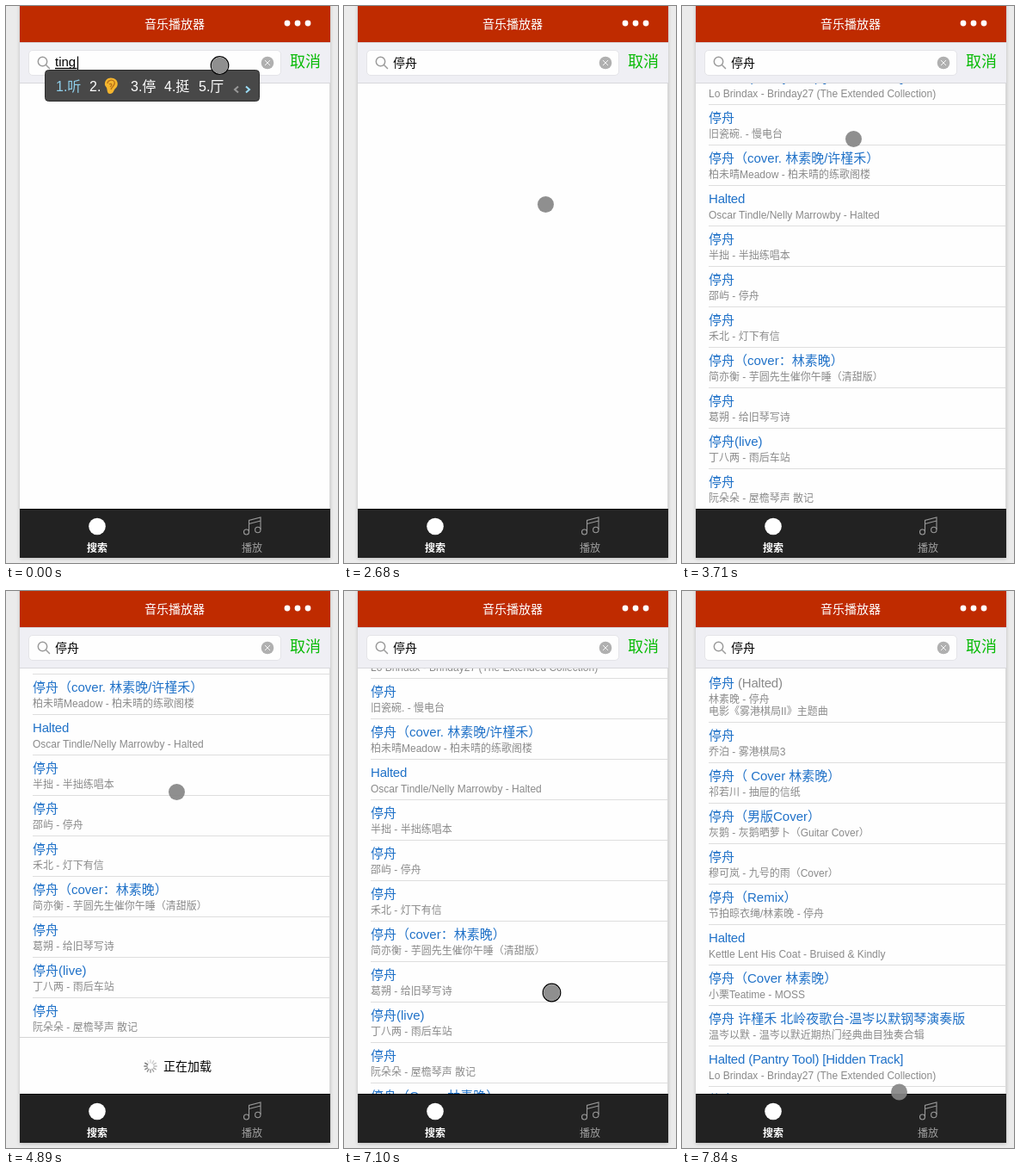
Animation, 386 px wide and 647 px high, one loop 7.99 s. Source, as an HTML page:

```html
<!DOCTYPE html>
<html lang="zh-CN">
<head>
<meta charset="utf-8">
<title>音乐播放器</title>
<style>
html, body { margin: 0; width: 100%; height: 100%; overflow: hidden; background: #ebebeb; }
svg { display: block; }
text {
  font-family: "Liberation Sans", "Noto Sans CJK SC", "Noto Sans CJK", sans-serif;
  white-space: pre;
  text-spacing-trim: space-all;
}
.latin { letter-spacing: -.2px; }
</style>
</head>
<body>
<svg id="stage" width="386" height="647" viewBox="0 0 386 647">
  <defs>
    <clipPath id="view"><rect x="16" y="90" width="361" height="494"/></clipPath>
    <filter id="soft" x="-10%" y="-10%" width="120%" height="120%"><feGaussianBlur stdDeviation="2"/></filter>
  </defs>
  <rect width="386" height="647" fill="#ebebeb"/>
  <rect x="16" y="-10" width="361" height="652" fill="#000" opacity=".2" filter="url(#soft)"/>
  <rect x="16" width="361" height="641" fill="#fefefe"/>

  <g id="list" clip-path="url(#view)">
    <g id="scroll">
      <g id="rows"></g>
      <g id="more"></g>
      <g id="footer">
        <path d="M16 1044.5H376" stroke="#d4d4d4"/>
        <g id="smallSpin" transform="translate(168 1078)"></g>
      </g>
    </g>
  </g>

  <rect x="16" width="361" height="42" fill="#bf2b00"/>
  <g fill="#fff"><circle cx="327" cy="20" r="3.4"/><circle cx="339" cy="20" r="3.4"/><circle cx="351" cy="20" r="3.4"/></g>

  <rect x="16" y="42" width="361" height="48" fill="#efeff4"/>
  <path d="M16 42.5H377M16 89.5H377" stroke="#d8d8dc"/>
  <rect x="26.5" y="51.5" width="293" height="29" rx="4.5" fill="#fefefe" stroke="#e4e4e8"/>
  <g fill="none" stroke="#9b9b9b" stroke-width="1.5" stroke-linecap="round">
    <circle cx="42.5" cy="64.5" r="5.2"/><path d="M46.5 68.5L50.5 72.5"/>
  </g>
  <circle cx="304" cy="66" r="7.3" fill="#b0b0b0"/>
  <path d="M301 63l6 6m0-6l-6 6" stroke="#f4f4f4"/>
  <g id="field"></g>
  <path id="underline" stroke="#000" stroke-width="1.4"/>
  <path id="caret" stroke="#000" stroke-width="1.2"/>

  <rect x="16" y="584" width="361" height="57" fill="#222"/>
  <path d="M16 584.5H377" stroke="#000"/>
  <circle cx="106" cy="604.5" r="9.8" fill="#fff"/>
  <g fill="none" stroke="#9a9a9a" stroke-width="1.1">
    <path d="M282.5 611V597.5L296 594V608M282.5 601.5L296 598"/>
    <circle cx="279.5" cy="611" r="3"/><circle cx="292.8" cy="608.5" r="3.2"/>
  </g>
  <path d="M376.5 90V584" stroke="#dadada"/>

  <g id="toast">
    <rect x="135" y="180" width="122" height="122" rx="5" fill="#5f5f5f"/>
    <g id="bigSpin" transform="translate(196 229)"></g>
  </g>

  <g id="popA"></g>
  <g id="popB"></g>

  <g id="arrow">
    <path d="M0 0V14.2L3.3 11.2L5.5 16L7.8 15L5.7 10.4H10.2Z" fill="#000" stroke="#fff" stroke-width=".9"/>
  </g>
  <g id="touch">
    <circle id="ring" r="10.3" fill="#fff" stroke="#000" stroke-width="1.2"/>
    <circle r="9.5" fill="#858585" opacity=".92"/>
  </g>
</svg>

<script>
const LOOP = 7990, TICK = LOOP / 54;
const NS = 'http://www.w3.org/2000/svg';
const $ = id => document.getElementById(id);

function add(parent, tag, attrs, content) {
  const el = document.createElementNS(NS, tag);
  for (const k in attrs) el.setAttribute(k, attrs[k]);
  if (content) el.textContent = content;
  parent.appendChild(el);
  return el;
}
const label = (parent, x, y, size, fill, str, extra) =>
  add(parent, 'text', { x, y, 'font-size': size, fill, ...extra }, str);
const show = (id, on) => $(id).setAttribute('display', on ? 'inline' : 'none');
const place = (id, x, y) => $(id).setAttribute('transform', `translate(${x} ${y})`);

// Fixed labels
const mid = { 'text-anchor': 'middle' };
const stage = $('list').parentNode;
const chrome = add(stage, 'g', {});
stage.insertBefore(chrome, $('toast'));
label(chrome, 196, 26, 14, '#fff', '音乐播放器', { ...mid, 'font-weight': 500 });
label(chrome, 330, 71, 18, '#09bb07', '取消');
label(chrome, 106, 634, 12, '#fff', '搜索', { ...mid, 'font-weight': 700 });
label(chrome, 286, 634, 12, '#a0a0a0', '播放', { ...mid, 'font-weight': 500 });
label($('toast'), 196, 271, 16, '#fff', '数据加载中', mid);
label($('footer'), 183, 1083, 14, '#000', '正在加载');
const typed = label($('field'), 57, 70, 15, '#000', '');

// Search results: title | subtitle
const SONG = '停舟';
const songs = [
  `${SONG}（Cover）|`,
  `${SONG}|乔泊 - 雾港棋局3`,
  `${SONG}（ Cover 林素晚）|祁若川 - 抽屉的信纸`,
  `${SONG}（男版Cover）|灰鹅 - 灰鹅晒萝卜（Guitar Cover）`,
  `${SONG}|穆可岚 - 九号的雨（Cover）`,
  `${SONG}（Remix）|节拍晾衣绳/林素晚 - ${SONG}`,
  'Halted|Kettle Lent His Coat - Bruised & Kindly',
  `${SONG}（Cover 林素晚）|小栗Teatime - MOSS`,
  `${SONG} 许槿禾 北岭夜歌台-温岑以默钢琴演奏版|温岑以默 - 温岑以默近期热门经典曲目独奏合辑`,
  'Halted (Pantry Tool) [Hidden Track]|Lo Brindax - Brinday27 (The Extended Collection)',
  `${SONG}|旧瓷碗. - 慢电台`,
  `${SONG}（cover. 林素晚/许槿禾）|柏未晴Meadow - 柏未晴的练歌阁楼`,
  'Halted|Oscar Tindle/Nelly Marrowby - Halted',
  `${SONG}|半拙 - 半拙练唱本`,
  `${SONG}|邵屿 - ${SONG}`,
  `${SONG}|禾北 - 灯下有信`,
  `${SONG}（cover：林素晚）|简亦衡 - 芋圆先生催你午睡（清甜版）`,
  `${SONG}|葛朔 - 给旧琴写诗`,
  `${SONG}(live)|丁八两 - 雨后车站`,
  `${SONG}|阮朵朵 - 屋檐琴声 散记`,
  `${SONG}（Cover 林素晚）|纪小满 - 练习曲`,
  `${SONG}|贺南枝 - ${SONG}`,
];
const BLUE = '#1f71c8', GREY = '#8a8a8a';
const line = (parent, y) => add(parent, 'path', { d: `M31 ${y}H376`, stroke: '#dedede' });

songs.forEach((song, i) => {
  const box = $(i < 20 ? 'rows' : 'more');
  if (!i) {
    const head = label(box, 31, 112.4, 15, BLUE, SONG);
    add(head, 'tspan', { fill: GREY, class: 'latin' }, ' (Halted)');
    label(box, 31, 130.3, 12, GREY, `林素晚 - ${SONG}`);
    label(box, 31, 144.3, 12, GREY, '电影《雾港棋局II》主题曲');
    line(box, 152.5);
    return;
  }
  const [title, sub] = song.split('|');
  const top = 152 + 47 * (i - 1);
  const latin = /^[\x20-\x7e]+$/.test(title) ? { class: 'latin' } : {};
  label(box, 31, top + 21.4, 15, BLUE, title, latin);
  label(box, 31, top + 39.3, 12, GREY, sub);
  if (i !== 19) line(box, top + 47.5);
});
const seam = line($('more'), 1045.5);

// Input method popups
function popup(box, width, items, xs) {
  add(box, 'rect', { x: 45.5, y: 74.5, width: width - 1, height: 36, rx: 4, fill: '#484848', stroke: '#2e2e2e' });
  items.forEach((s, i) => label(box, xs[i], 99, 16, i ? '#fff' : '#8fd0ec', `${i + 1}.${s}`));
  const end = 45 + width;
  const chev = (x, dx, stroke) => add(box, 'path',
    { d: `M${x} 93.5l${dx} 3.5l${-dx} 3.5`, fill: 'none', stroke, 'stroke-width': 2 });
  chev(end - 25, -4, '#999');
  chev(end - 16, 4, '#9bdcf5');
}
popup($('popA'), 250, ['听', '', '停', '挺', '厅'], [58, 97, 145, 184, 224]);
popup($('popB'), 319, [SONG, '汀洲', '听舟', '亭舟', '停周'], [58, 113, 168, 223, 278]);
add($('popA'), 'path', {
  d: 'M115 92C114 85 120 82 125 84C131 86 131 93 127 96C125 98 125 102 121 102C117 102 118 97 117 95Z',
  fill: '#f5b62e',
});
add($('popA'), 'path', {
  d: 'M118 90C118 86 124 85 126 88C128 92 123 93 122 97M120 91C123 89 124 92 121 94',
  fill: 'none', stroke: '#b9721a', 'stroke-width': 1.3,
});

// Spinners with twelve spokes
function spinner(id, inner, outer, width, color) {
  return Array.from({ length: 12 }, (_, i) => add($(id), 'path', {
    d: `M0 ${-inner}V${-outer}`, transform: `rotate(${i * 30})`,
    stroke: color, 'stroke-width': width, 'stroke-linecap': 'round',
  }));
}
function spin(spokes, head, low, high) {
  spokes.forEach((s, i) => {
    const lag = (head - i + 1200) % 12;
    s.setAttribute('opacity', high - (high - low) * lag / 11);
  });
}
const big = spinner('bigSpin', 9, 14, 2.8, '#fff');
const small = spinner('smallSpin', 4, 7.2, 1.5, '#555');

// Steps: [tick, values...]
const scrollSteps = [
  [20, 0], [21, 30], [22, 130], [23, 270], [24, 400], [25, 461], [28, 461],
  [29, 470], [30, 500], [31, 526], [45, 526], [46, 515], [47, 497], [48, 474],
  [49, 400], [50, 290], [51, 170], [52, 60], [53, 0],
];
const touchSteps = [
  [0, 248.5, 69], [14, 248.5, 69], [15, 248, 84], [16, 245, 125], [18, 234.5, 230.5],
  [19, 232, 420], [20, 232, 420], [22, 220, 300], [23, 210, 210], [24, 203, 165],
  [25, 199.5, 154.5], [26, 198, 230], [28, 199, 400], [29, 199, 390], [31, 198, 290],
  [33, 198.5, 233.5], [40, 198.5, 233.5], [44, 238, 414], [45, 238, 414],
  [46, 239, 425], [48, 241.5, 466.5], [49, 244, 520], [50, 247, 555], [53, 252.5, 582],
];
const arrowSteps = [[7, 246.5, 70], [11, 246.5, 70], [14, 248, 75]];

function at(steps, k) {
  const n = steps.findIndex(s => s[0] >= k);
  if (n < 0) return steps[steps.length - 1].slice(1);
  if (n === 0) return steps[0].slice(1);
  const a = steps[n - 1], b = steps[n];
  const p = (k - a[0]) / (b[0] - a[0]);
  return a.slice(1).map((v, i) => v + (b[i + 1] - v) * p);
}

function draw(time) {
  const k = Math.floor((time % LOOP) / TICK + .05) % 54;
  const within = (from, to) => k >= from && k < to;

  const done = k >= 4;
  typed.textContent = done ? SONG : k ? 'ting zhou' : 'ting';
  typed.setAttribute('font-size', done ? 14 : 15);
  typed.setAttribute('y', done ? 71 : 70);
  const end = done ? 85.5 : k ? 58 + typed.getComputedTextLength() : 83.5;
  $('underline').setAttribute('d', `M57 72.5H${end - 1}`);
  $('caret').setAttribute('d', `M${end} 58.5V74`);
  show('underline', !done);
  show('caret', k < 7);
  show('popA', k < 1);
  show('popB', within(1, 4));

  show('toast', within(7, 15));
  show('list', k >= 19);
  show('footer', within(29, 40));
  show('more', k >= 40);
  const step = Math.floor(k * TICK / (1000 / 12));
  spin(big, step + 1, .3, 1);
  spin(small, step, .15, .8);
  place('scroll', 0, -at(scrollSteps, k)[0]);

  const pointing = within(7, 15);
  show('arrow', pointing);
  show('touch', !pointing);
  show('ring', k === 0 || within(47, 49));
  place('arrow', ...at(arrowSteps, k));
  place('touch', ...at(touchSteps, k));
}

const start = performance.now();
function loop() {
  draw(performance.now() - start);
  requestAnimationFrame(loop);
}
loop();
</script>
</body>
</html>
```
